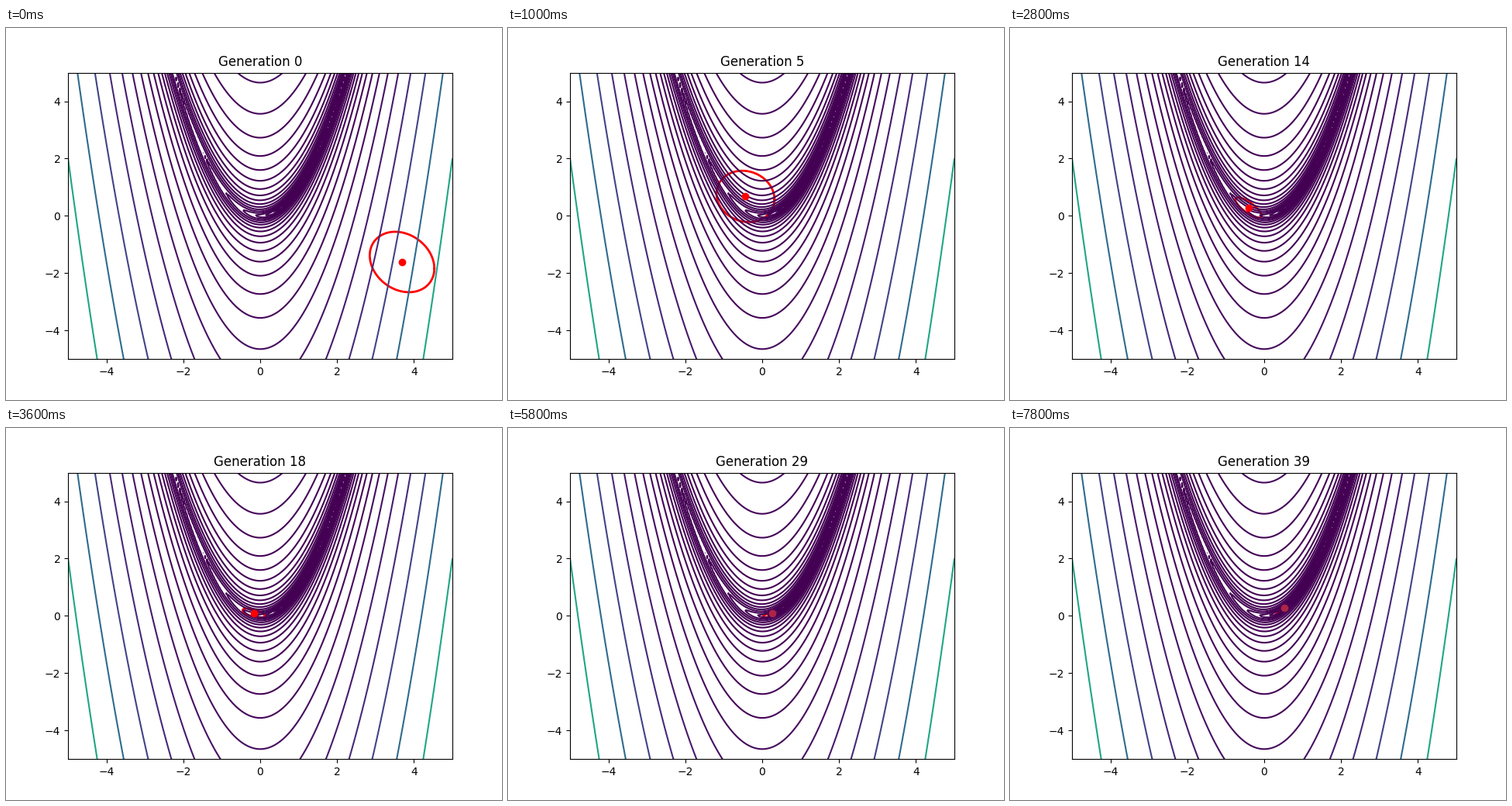
Animation, 640 px wide and 480 px high, one loop 8 s. Source, as a matplotlib script:

```python
import numpy as np
import matplotlib.pyplot as plt
from matplotlib.animation import FuncAnimation

GENERATIONS = 40
INTERVAL = 200
LANDING = 5     # generation at which the search reaches the valley
ALIGNED = 14    # from here on the spread follows the valley floor

RED = np.array([1.0, 0.0, 0.0])
DULL_RED = np.array([0.68, 0.14, 0.28])


def rosenbrock(x, y):
    return 100 * (y - x**2) ** 2 + (x - 1) ** 2


def shrink(gen, start, end):
    return end + (start - end) / (1 + (gen / 8.6) ** 3.3)


def mean(gen):
    """Straight run to the valley, a drop onto its floor, then along y = x^2."""
    x = np.interp(gen, [0, LANDING, ALIGNED, 22, 39],
                  [3.69, -0.435, -0.41, 0.07, 0.53])
    if gen < LANDING:
        y = np.interp(gen, [0, LANDING], [-1.61, 0.68])
    else:
        y = x**2 + 0.49 * np.exp(-(gen - LANDING) / 6.5)
    return x, y


def ellipse(gen):
    x, y = mean(gen)
    slope = np.interp(gen, [0, LANDING, 9, ALIGNED], [-0.27, -0.13, 0.27, 2 * x])
    width = shrink(gen, 0.84, 0.24)
    height = shrink(gen, 1.03, 0.05)
    t = np.linspace(0, 2 * np.pi, 121)
    dx = width * np.cos(t)
    return x + dx, y + slope * dx + height * np.sin(t)


fig, ax = plt.subplots(figsize=(6.4, 4.8), dpi=100)
grid = np.linspace(-5, 5, 200)
gx, gy = np.meshgrid(grid, grid)
gz = rosenbrock(gx, gy)
levels = np.logspace(np.log10(gz.min()), np.log10(gz.max()), 30)
ax.contour(gx, gy, gz, levels=levels, cmap="viridis", zorder=2)

ring, = ax.plot([], [], color=RED, lw=2, zorder=1)
dot, = ax.plot([], [], "o", color=RED, zorder=3)
title = ax.set_title("Generation 0")
ax.set_xlim(-5, 5)
ax.set_ylim(-5, 5)


def update(gen):
    x, y = mean(gen)
    ring.set_data(*ellipse(gen))
    dot.set_data([x], [y])
    fade = np.clip((gen - 19) / 8, 0, 1)
    dot.set_color(tuple(RED + (DULL_RED - RED) * fade))
    title.set_text(f"Generation {gen}")
    return ring, dot, title


anim = FuncAnimation(fig, update, frames=GENERATIONS, interval=INTERVAL,
                     repeat=True, repeat_delay=0, blit=False)
plt.show()
```
